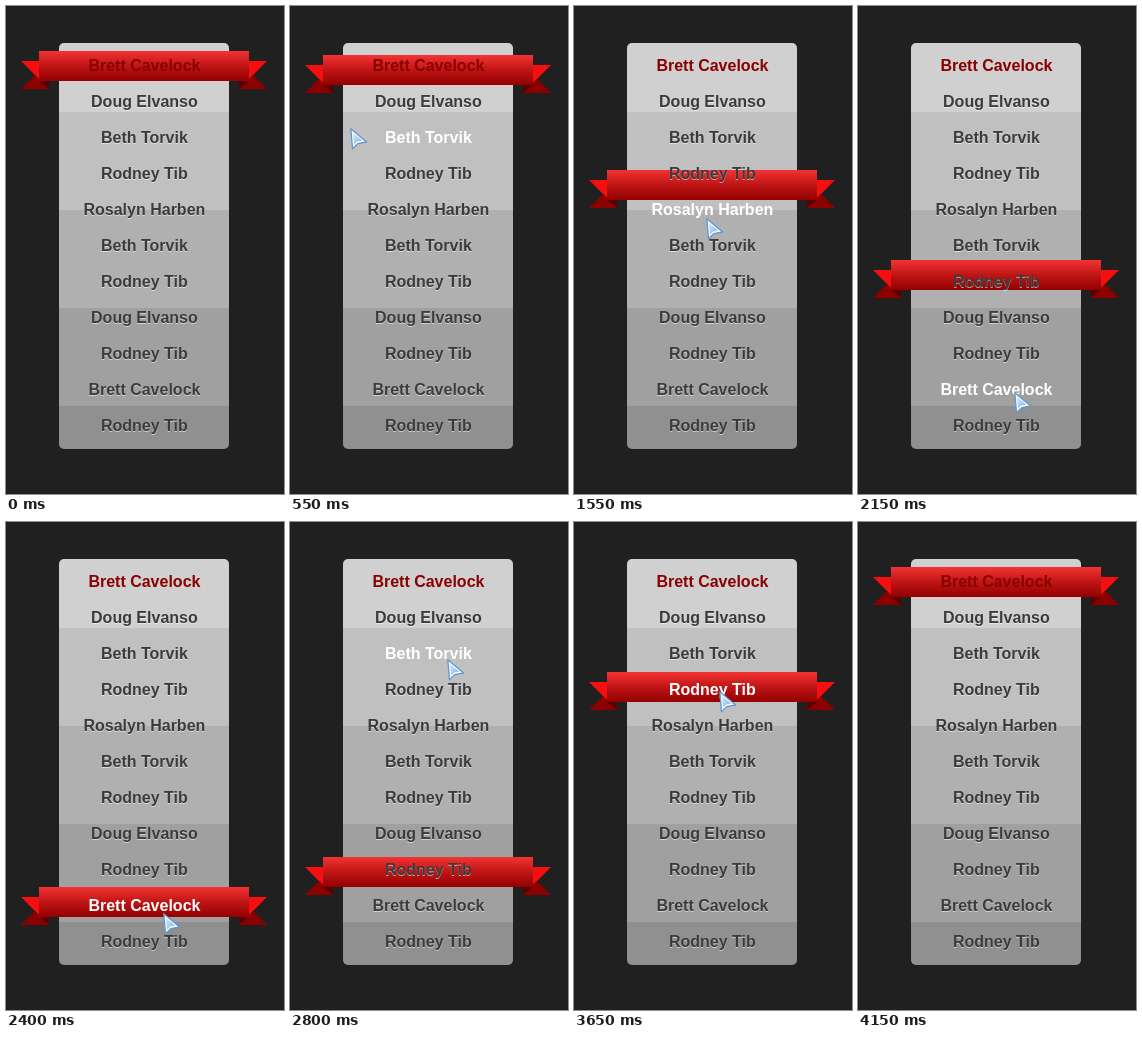
These frames come from a looping animation (278 by 488 pixels, 4.2 s). An HTML page:

```html
<!DOCTYPE html>
<html lang="en">
<head>
<meta charset="utf-8">
<title>Ribbon menu</title>
<style>
  html, body { margin: 0; width: 100%; height: 100%; overflow: hidden; background: #202020; }
  svg { display: block; width: 278px; height: 488px; }
  text {
    font: bold 16px "Liberation Sans", Arial, sans-serif;
    text-anchor: middle;
    fill: #3b3b3d;
    text-shadow: 0 1px 0 rgba(255, 255, 255, .55);
  }
  .current { fill: #8a0000; text-shadow: none; }
  .hover { fill: #fff; text-shadow: none; }
</style>
</head>
<body>
<svg viewBox="0 0 278 488">
  <defs>
    <linearGradient id="red" x2="0" y2="1">
      <stop offset="0" stop-color="#f43333"/>
      <stop offset=".5" stop-color="#bf1515"/>
      <stop offset="1" stop-color="#940000"/>
    </linearGradient>
    <linearGradient id="glass" x2="1" y2="1">
      <stop offset="0" stop-color="#d4e8fc"/><stop offset="1" stop-color="#7fb0e4"/>
    </linearGradient>
    <clipPath id="rounded"><rect x="53" y="37" width="170" height="406" rx="5"/></clipPath>
    <g id="tail">
      <path fill="#f50f0f" d="M15 10H43V38Z"/>
      <path fill="#8c0000" d="M15 38L29 24L43 38Z"/>
      <path fill="#5a0000" d="M33 30H43V38Z"/>
    </g>
  </defs>
  <g id="panel" clip-path="url(#rounded)"></g>
  <g id="ribbon">
    <use href="#tail"/>
    <use href="#tail" transform="translate(276) scale(-1 1)"/>
    <rect x="33" width="210" height="30" fill="url(#red)"/>
  </g>
  <g id="menu"></g>
  <g id="cursor">
    <path d="M.8 .8L2.5 20.8L7.8 15.6L16.6 14Z" fill="#f6faff" stroke="#5f97cf" stroke-width="1.3" stroke-linejoin="round"/>
    <path d="M3 5L4 16.6L7.2 13.5L12.2 12.6Z" fill="url(#glass)"/>
  </g>
</svg>
<script>
const LOOP = 4200, STEP = 50, ROW = 36, BANDS = 5;
const [brett, doug, beth, rodney, rosalyn] =
  ["Brett Cavelock", "Doug Elvanso", "Beth Torvik", "Rodney Tib", "Rosalyn Harben"];
const names = [brett, doug, beth, rodney, rosalyn, beth, rodney, doug, rodney, brett, rodney];

// Each move: start time, end time, where it ends
const ribbonMoves = [
  [500, 850, 2], [1150, 1820, 4], [1940, 2450, 9],
  [2690, 3150, 2], [3450, 3700, 3], [3700, 4130, 0]
];
const cursorMoves = [
  [450, 700, 120, 123], [1100, 2250, 157, 391], [2650, 2800, 157, 137],
  [3400, 3650, 145, 169], [3650, 3800, 240, 190]
];

const byId = id => document.getElementById(id);
const svg = (tag, parent, attrs) => {
  const node = document.createElementNS("http://www.w3.org/2000/svg", tag);
  for (const key in attrs) node.setAttribute(key, attrs[key]);
  return parent.appendChild(node);
};

for (let i = 0; i < BANDS; i++) {
  const grey = 208 - 16 * i;
  svg("rect", byId("panel"),
    { x: 53, y: 8 + 98 * i, width: 170, height: 98, fill: `rgb(${grey},${grey},${grey})` });
}

const items = names.map((name, i) => {
  const item = svg("text", byId("menu"), { x: 138.4, y: 65 + ROW * i });
  item.textContent = name;
  item.classList.toggle("current", i === 0);
  return item;
});

const swing = u => (1 - Math.cos(Math.PI * Math.min(1, Math.max(0, u)))) / 2;

// Position at time t after running the moves one after another
const follow = (from, moves, t) => moves.reduce(
  (pos, [start, end, ...to]) =>
    pos.map((p, i) => p + (to[i] - p) * swing((t - start) / (end - start))),
  from);

function draw(now) {
  const t = Math.floor(now % LOOP / STEP) * STEP;
  const [row] = follow([0], ribbonMoves, t);
  const [x, y] = follow([29, 122], cursorMoves, t).map(Math.round);
  const shown = t >= 50 && t < 3800;
  const hovered = shown && x >= 53 && x < 223 ? Math.floor((y - 42) / ROW) : -1;

  byId("ribbon").setAttribute("transform", `translate(0 ${Math.round(45 + ROW * row)})`);
  byId("cursor").setAttribute("transform", `translate(${x} ${y})`);
  byId("cursor").setAttribute("visibility", shown ? "visible" : "hidden");
  items.forEach((item, i) => item.classList.toggle("hover", i === hovered));
}

const start = performance.now();
function frame() {
  draw(performance.now() - start);
  requestAnimationFrame(frame);
}
frame();
</script>
</body>
</html>
```
